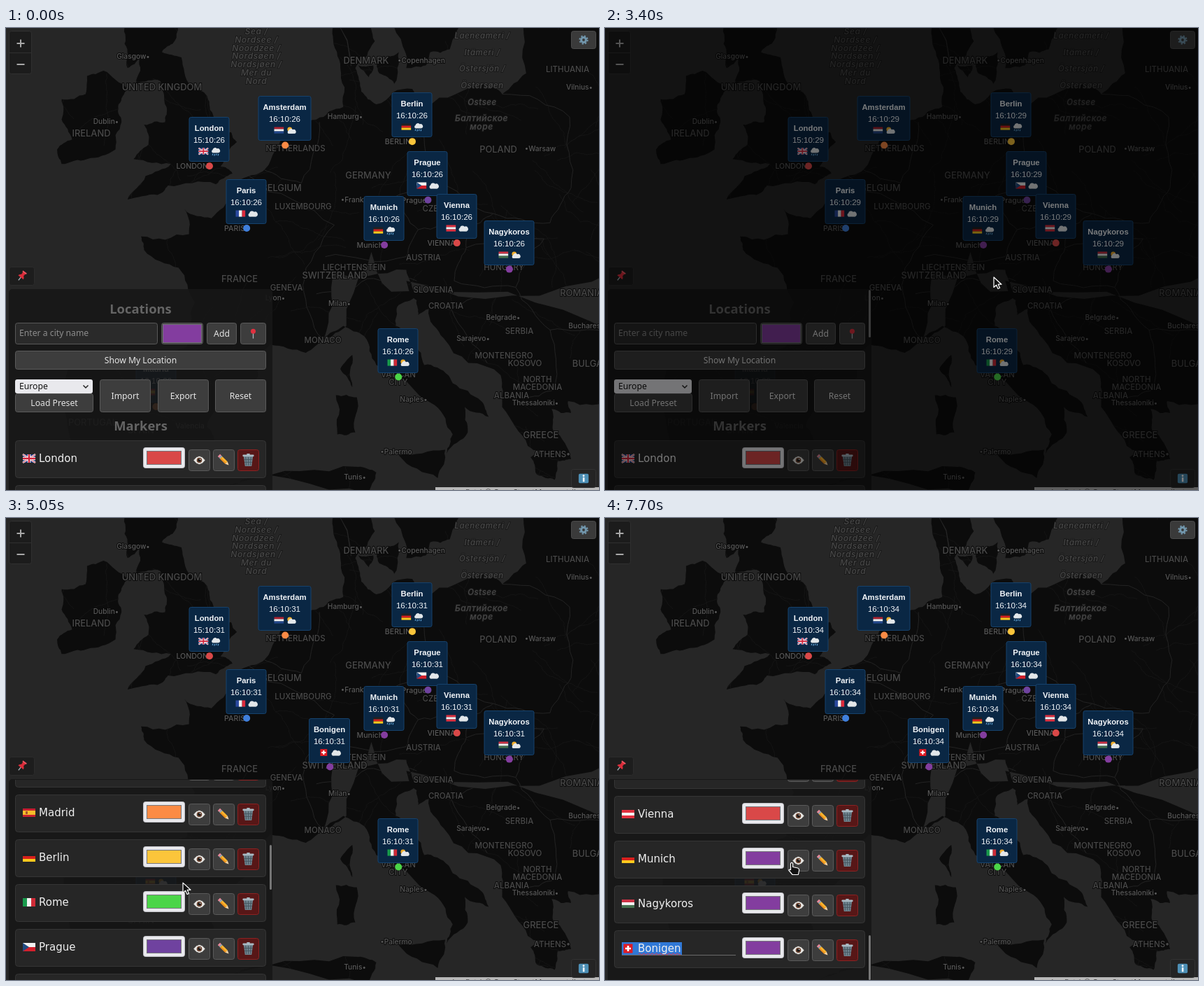
An HTML page for the animation above (8 s loop, 848 by 660 pixels).

```html
<!DOCTYPE html>
<html lang="en">
<head>
<meta charset="utf-8">
<title>City clocks</title>
<style>
html, body { margin: 0; width: 100%; height: 100%; overflow: hidden; background: #262626; }
svg { display: block; width: 848px; height: 660px; }
text { white-space: pre; }
.map { font-family: Inter, sans-serif; font-weight: 500; text-anchor: middle; paint-order: stroke; stroke: #0b0b0b; stroke-width: 1.8px; }
.land { fill: #494949; }
.town { fill: #585858; }
.sea { fill: #484848; font-style: italic; stroke: #181818; letter-spacing: .6px; }
.tip { font-family: "Liberation Sans", Arial, sans-serif; text-anchor: middle; fill: #f2f5f8; }
.ui { font-family: "Noto Sans", sans-serif; fill: #e4e4e4; }
.mid { text-anchor: middle; }
.head { fill: #646464; font-weight: 700; }
.row { font-family: "DejaVu Sans", sans-serif; fill: #efefef; }
</style>
</head>
<body>
<svg id="stage" viewBox="0 0 848 660" xmlns="http://www.w3.org/2000/svg"></svg>
<script>
const LOOP = 8000;
const PICK = 1750, ASK = 2450, ANSWER = 3550, ADDED = 4000, EDIT = 6750;
const RED = '#d94848', BLUE = '#3f7fdc', ORANGE = '#fb8b45', YELLOW = '#fbc53b', GREEN = '#4bd548', PURPLE = '#833d9f';

const rect = (x, y, w, h, fill, more = '') => `<rect x="${x}" y="${y}" width="${w}" height="${h}" fill="${fill}" ${more}/>`;
const box = (x, y, w, h, fill, edge, r = 0) => rect(x + .5, y + .5, w - 1, h - 1, fill, `rx="${r}" stroke="${edge}"`);
const path = (d, more = '') => `<path d="${d}" ${more}/>`;
const text = (x, y, size, cls, s, more = '') =>
  `<text x="${x}" y="${(y + size * .36).toFixed(1)}" font-size="${size}" class="${cls}" ${more}>${s}</text>`;
const at = (x, y, k, body) => `<g transform="translate(${x} ${y}) scale(${k})">${body}</g>`;
const dot = (x, y, r, fill) => `<circle cx="${x}" cy="${y}" r="${r}" fill="${fill}"/>`;

let seed = 7;
const random = () => (seed = (seed * 16807) % 2147483647) / 2147483647;

// Map: key points in longitude and latitude, roughened by midpoint displacement
const project = (lon, lat) => [
  293.8 + 21.43 * lon,
  1489.6 - 1228 * Math.log(Math.tan(Math.PI / 4 + lat * Math.PI / 360))
];
function rough(a, b, depth) {
  if (!depth) return [b];
  const k = (random() - .5) * .22;
  const m = [(a[0] + b[0]) / 2 + (b[1] - a[1]) * k, (a[1] + b[1]) / 2 - (b[0] - a[0]) * k];
  return [...rough(a, m, depth - 1), ...rough(m, b, depth - 1)];
}
const line = pts => 'M' + pts.flatMap((p, i) => i ? rough(pts[i - 1], p, 3) : [p])
  .map(p => p.map(v => v.toFixed(1)).join(' ')).join('L');
const points = s => s.split(',').map(p => project(...p.split(' ').map(Number)));
const shape = s => { const p = points(s); return line([...p, p[0]]) + 'Z'; };

const coasts = {
  ireland: '-6 53.3,-6.4 52.2,-8.3 51.8,-10 51.6,-10.3 52.2,-9.3 52.6,-10 53.4,-10 54.2,-8.4 54.4,-8.3 55.1,-7.2 55.3,-5.6 54.6,-6.2 54',
  britain: '-5.6 57.2,-5.8 56.3,-5.6 55.4,-4.8 55.8,-5 54.8,-3.4 54.9,-3 53.9,-3.1 53.3,-4.5 53.2,-4.2 52.4,-5.2 51.8,-2.7 51.6,-4.4 51.1,-5.6 50.1,-3.6 50.3,-2.9 50.7,.3 50.75,1.4 51.2,.6 51.5,1.7 52.5,1.3 52.9,.2 52.85,.1 53.6,-.4 54.4,-1.3 54.7,-2 55.8,-3.3 56,-2.6 56.3,-2 57.3',
  west: '3.1 41.9,.7 40.7,-.3 39.4,.2 38.7,-2 36.8,-8.9 37,-9.4 38.7,-9.2 43.1,-1.6 43.4,-1.1 45.5,-2.2 47.1,-4.5 47.9,-4.7 48.5,-1.5 48.6,-1.8 49.7,0 49.3,1.6 50.2,1.7 50.9,3.6 51.4,4.7 52.9,7 53.4,8.8 53.9,8.6 55.4,8.1 56.6,8.3 57.2,12 50,9 44.4,7.5 43.75,6.3 43.1,3.9 43.5,3.1 43',
  east: '8.3 57.2,10.4 57.4,10.9 56.4,9.6 55.4,10 54.5,11 54,13.4 54.6,14.3 53.9,18.3 54.8,19.4 54.4,21 55.2,21.1 57.5,27 57.5,27 44,12 46,9.5 50',
  zealand: '11 55.7,12.5 56,12.2 54.8,11.2 55.2',
  funen: '9.8 55.5,10.8 55.5,10.5 55.05',
  sweden: '12 57.5,13 55.4,14.3 55.5,14.6 56,15.9 56.1,16.6 57.5',
  italy: '7.5 43.75,8.8 44.4,10.2 43.9,11 42.5,14.9 40.5,16.1 39,15.7 38,17.1 39.1,16.9 40.4,18.5 39.9,18 40.7,16.1 41.6,15.8 42,14.2 42.5,13.5 43.6,12.3 44.4,12.4 45.3,13.5 45.7,13 47,8 47',
  balkans: '13 46.5,13.7 45.6,13.8 44.9,14.5 45.2,15.5 43.8,19.3 42,19.4 40.4,21.1 38.4,22.9 38.1,21.3 37.8,21.7 36.9,22.9 36.6,23.1 37.6,24 37.7,22.8 39.2,22.7 40.3,24 40.1,23.8 40.7,27 40.8,27 47',
  corsica: '8.6 42.3,9.4 43,9.4 41.4',
  sardinia: '8.3 41,9.7 40.9,9.6 39.1,8.4 39',
  sicily: '12.5 37.9,15.6 38.2,15.1 36.7',
  africa: '2 36.6,9.8 37.3,11 37,10.5 35.8,0 35.8'
};
const borders = ['2.5 51.1,8.2 49,6.1 46.3,7.5 43.75', '3.4 51.4,6 50.8,7.2 53.3',
  '14.3 53.9,14.8 50.9,12.2 50.2,13.8 48.8,17 48.8,18.8 49.5,14.8 50.9', '7.6 47.6,13 47.6,13.8 48.8',
  '19.4 54.4,23.9 53.5,24 50.6,22.6 49.1,18.8 49.5', '17 48.8,17 48,22.2 48.4,20.3 46.2,16.2 46.5,17 48',
  '7 45.9,10.4 46.6,13.7 46.5', '19 45.9,16 45.2,18.4 42.6', '20.3 46.2,22.6 44.2,26.5 44', '22.6 44.2,22.9 41.3,20.7 40.9'];
const land = Object.values(coasts).map(shape).join('');

// A faint web of roads, drawn on land only
function road() {
  let x = random() * 848, y = random() * 660, turn = random() * 6.3;
  const pts = [[x, y]];
  for (let i = 0; i < 4; i++) {
    turn += random() - .5;
    pts.push([x += 26 * Math.cos(turn), y += 26 * Math.sin(turn)]);
  }
  return line(pts);
}
const roads = Array.from({ length: 130 }, road).join('');

// Labels: "name x y" separated by commas, lines of one name by |
const labels = (list, size, cls) => list.split(',').map(s => {
  const [, name, x, y] = s.trim().match(/^(.+) (\d+) (\d+)$/);
  return name.split('|').map((n, i) => text(x, +y + i * (size - .3), size, 'map ' + cls, n)).join('');
}).join('');
const names =
  labels('Sea /|Nordsee /|Noordzee /|Nordsøen /|Nordsjøen /|Mer du|Nord 358 5,Балтийское|море 680 129', 12, 'sea') +
  ['Laeneameri /', 'Itämeri /', 'Östersjön /', 'Östersøen', 'Ostsee'].map((s, i) => text(681, 11 + i * 23.6, 11.4, 'map sea', s)).join('') +
  labels(`UNITED KINGDOM 223 84,IRELAND 122 150,DENMARK 515 46,POLAND 704 173,GERMANY 518 210,BELGIUM 394 228,
    SWITZERLAND 470 353,FRANCE 334 358,ROMANIA 823 378,BULGARIA 842 479,GREECE 765 581,PORTUGAL 124 563,SPAIN 193 574`, 12.9, 'land') +
  labels(`LITHUANIA 803 59,NETHERLANDS 414 172,LUXEMBOURG 425 255,CZECHIA 621 258,AUSTRIA 597 328,HUNGARY 712 342,
    LIECHTENSTEIN 498 342,SLOVENIA 611 374,CROATIA 629 397,MONACO 453 446,SERBIA 734 433,MONTENEGRO 712 468,KOSOVO 742 479,
    NORTH|MACEDONIA 760 502,ALBANIA 723 525,VATICAN|CITY 561 495,GENEVA 401 371,ATHENS• 781 609`, 11.5, 'land') +
  labels(`Glasgow• 182 40,Dublin• 143 133,•Copenhagen 594 46,Vilnius• 820 84,Hamburg• 485 126,•Warsaw 764 172,•Frankfurt 504 245,
    Lyon• 385 385,Milan• 477 393,Belgrade• 711 413,Sarajevo• 668 443,Thessaloniki• 757 535,Naples• 583 530,•Palermo 558 605,
    Tunis• 499 641,Bucharest 829 425,Valencia 263 568`, 10.2, 'town');

const map = `<clipPath id="soil">${path(land)}</clipPath>` + rect(0, 0, 848, 660, '#262626') + path(land, 'fill="#0c0c0c"') +
  `<g clip-path="url(#soil)" fill="none">${path(roads, 'stroke="#171717" stroke-width=".8"')}${path(borders.map(b => line(points(b))).join(''), 'stroke="#232323"')}</g>` + names;

// Small pictures
const bars = (cols, up) => cols.split(' ').map((c, i, a) => up
  ? rect(i * 18 / a.length, 0, 18 / a.length, 12, c)
  : rect(0, i * 12 / a.length, 18, 12 / a.length, c)).join('');
const stroke = (d, color, w) => path(d, `fill="none" stroke="${color}" stroke-width="${w}"`);
const flags = {
  gb: rect(0, 0, 18, 12, '#22377e') + stroke('M0 0L18 12M18 0L0 12', '#fff', 2.6) + stroke('M0 0L18 12M18 0L0 12', '#cf2038', .9) +
    stroke('M9 0V12M0 6H18', '#fff', 4.4) + stroke('M9 0V12M0 6H18', '#cf2038', 2.4),
  fr: bars('#2b4aa0 #f2f2f2 #dd2b3c', true), it: bars('#199a4c #f2f2f2 #cf2b37', true),
  es: bars('#c8202f #f7bd2a #f7bd2a #c8202f') + rect(4, 4, 3, 4, '#a8562c'),
  de: bars('#222 #d8201c #fbc91e'), nl: bars('#b02331 #f2f2f2 #24498d'), ru: bars('#f2f2f2 #2448a4 #d0281f'),
  ua: bars('#2a6fc4 #fbd42a'), at: bars('#e0303f #f5f5f5 #e0303f'), hu: bars('#cc3245 #f2f2f2 #45704f'),
  cz: bars('#f2f2f2 #d3202c') + path('M0 0L9 6L0 12Z', 'fill="#214a80"'),
  ch: rect(2.5, -.5, 13, 13, '#e01b24') + stroke('M9 2V10M5 6H13', '#fff', 2.6)
};
const puff = path('M-5 4.5A3 3 0 0 1 -5 -1A4.2 4.2 0 0 1 2.5 -3A3.4 3.4 0 0 1 6 4.5Z', 'fill="#e3e7ea"') +
  path('M-6.5 3.4Q0 5 7 3.2Q6.6 4.5 5.6 4.5H-5Z', 'fill="#b5c0c7"');
const weather = {
  cloud: puff,
  sun: dot(-2, -2, 3.8, '#f0ae2c') + at(.6, 1.2, .9, puff),
  rain: at(0, -2, .9, puff) + stroke('M-4 3.5L-5 6M-1 4L-2 6.8M2 3.5L1 6M5 4L4 6.5', '#6db4e8', 1.2)
};
const pic = {
  eye: path('M-9 0Q0 -13 9 0Q0 13 -9 0Z', 'fill="#e9e9e6" stroke="#33302e"') + dot(0, 0, 4, '#6d4633') + dot(0, 0, 2.2, '#161616') + dot(1.2, -1.4, .8, '#fff'),
  pencil: `<g transform="rotate(45)">${rect(-10.5, -2.4, 3, 4.8, '#e98a9b')}${rect(-7.5, -2.4, 2, 4.8, '#9fb0b8')}${rect(-5.5, -2.4, 11, 4.8, '#fbb52e')}${rect(-5.5, .6, 11, 1.8, '#e98a1c')}${path('M5.5 -2.4L10.5 0L5.5 2.4Z', 'fill="#f3d3a5"')}</g>`,
  trash: path('M-7 -6L-5 9H5L7 -6Z', 'fill="#6f848f"') + stroke('M-4 -5L-3 8M0 -5V8M4 -5L3 8M-6.3 -1H6.3M-5.8 3H5.8', '#46565f', 1) +
    rect(-8.5, -8.3, 17, 2.8, '#a9bac3', 'rx="1.2"') + rect(-2.5, -10, 5, 2, '#a9bac3', 'rx="1"'),
  pin: stroke('M0 -1V7.5', '#a9b4ba', 1.4) + dot(0, -3.4, 3.7, '#e0303f'),
  push: `<g transform="rotate(38)">${stroke('M0 2V8', '#a9b4ba', 1.3)}${path('M-2.6 -7H2.6L2 -2Q5 0 5 2.4H-5Q-5 0 -2 -2Z', 'fill="#d92d3a"')}${rect(-3.6, -8, 7.2, 2, '#ee5560')}</g>`,
  gear: dot(0, 0, 5.2, '#7297ad') + `<circle r="6" fill="none" stroke="#7297ad" stroke-width="2" stroke-dasharray="2.36"/>` + dot(0, 0, 2, '#3a3a3a'),
  info: rect(-7.5, -7, 15, 14, '#4d8fb5', 'rx="2"') + rect(-1.2, -1.5, 2.6, 6.5, '#fff') + dot(0, -4, 1.5, '#fff')
};

// name, flag, sky, colour, longitude, latitude, map caption
const cities = [
  ['London', 'gb', 'rain', RED, -.13, 51.51, 'LONDON'], ['Paris', 'fr', 'cloud', BLUE, 2.35, 48.86, 'PARIS'],
  ['Madrid', 'es', 'sun', ORANGE, -3.7, 40.42, ''], ['Berlin', 'de', 'rain', YELLOW, 13.4, 52.52, 'BERLIN'],
  ['Rome', 'it', 'sun', GREEN, 12.48, 41.91, ''], ['Prague', 'cz', 'cloud', '#6f429f', 14.45, 50.08, 'Prague'],
  ['Moscow', 'ru', 'cloud', RED, 37.6, 55.75, ''], ['Amsterdam', 'nl', 'sun', ORANGE, 4.92, 52.37, ''],
  ['Kyiv', 'ua', 'cloud', YELLOW, 30.5, 50.45, ''], ['Vienna', 'at', 'cloud', RED, 16.38, 48.21, 'VIENNA'],
  ['Munich', 'de', 'rain', PURPLE, 11.54, 48.12, 'Munich'], ['Nagykoros', 'hu', 'sun', PURPLE, 19.88, 47.03, ''],
  ['Bonigen', 'ch', 'cloud', PURPLE, 7.91, 46.68, '']
];
const pen = document.createElement('canvas').getContext('2d');
pen.font = 'bold 11.3px "Liberation Sans", Arial, sans-serif';

const caption = ([, , , , lon, lat, s]) => {
  const [x, y] = project(lon, lat);
  return text(x - 2, y, 10.6, 'map town', s, 'style="text-anchor:end"');
};
const spot = ([name, , , color, lon, lat]) => `<g class="at-${name}">${dot(...project(lon, lat), 5, color)}</g>`;
function tip([name, flag, sky, , lon, lat]) {
  const [x, y] = project(lon, lat).map(v => Math.round(v) - .5);
  const w = Math.max(57, Math.round(pen.measureText(name).width + 13)), top = y - 69;
  return `<g class="at-${name}">` + rect(x - w / 2, top, w, 63, '#0a2744', 'rx="2.5" stroke="#16426c"') +
    text(x, top + 15, 11.3, 'tip', name, 'font-weight="700"') + text(x, top + 32, 11.6, 'tip clock', '', `data-city="${name}"`) +
    at(x - 15, top + 44, .76, flags[flag]) + at(x + 9, top + 49, .88, weather[sky]) + '</g>';
}

// Panel; every button remembers its place so the pointer can react to it
const hot = [];
function button(x, y, w, h, label, icon = '', fill = '#3d3d3d', edge = '#5a5a5a') {
  hot.push([x, y, w, h]);
  return box(x, y, w, h, fill, edge, 3) + text(x + w / 2, y + h / 2, 12.2, 'ui mid', label) + at(x + w / 2, y + h / 2, .95, icon);
}
const swatch = (x, y, w, h, color) => box(x, y, w, h, color, '#77777c');

function row([name, flag, , color], i) {
  const y = 589 + 64 * i;
  const squiggle = `M48 ${y + 34}` + 'q1.5 -2.4 3 0t3 0'.repeat(10);
  const edit = name === 'Bonigen' ? `<g id="edit">${rect(24, y + 17, 86, 18.5, '#3078d6')}${stroke(`M24 ${y + 35.5}H187`, '#6a6a6a', 1)}${stroke(squiggle, '#e0394a', 1)}</g>` : '';
  return `<g class="at-${name}">` + box(13, y, 359, 54, '#262626', '#353535', 4) + edit +
    at(24, y + 20, 1, flags[flag]) + text(47, y + 26, 15, 'row', name) +
    box(196, y + 10, 60, 30, '#e9e9ed', '#c2c2c8', 3) + swatch(201, y + 15, 50, 20, color) +
    button(261, y + 13, 31, 31, '', pic.eye) + button(296, y + 13, 31, 31, '', pic.pencil) +
    button(331, y + 13, 31, 31, '', pic.trash, '#571717', '#8c2222') + '</g>';
}

const panel = rect(4, 373, 377, 300, '#171717', 'rx="5" fill-opacity=".89"') + '<g clip-path="url(#view)"><g id="list">' +
  text(192.5, 401, 18.4, 'ui head mid', 'Locations') +
  box(13, 421, 204, 31, '#2a2a2a', '#585858', 3) + text(19, 436, 12.2, 'ui', 'Enter a city name', 'style="fill:#8d8d8d"') +
  box(222, 421, 60, 31, '#3d3d3d', '#5a5a5a', 3) + swatch(224, 423, 56, 27, PURPLE) +
  button(287, 421, 43, 31, 'Add') + button(335, 421, 37, 31, '', pic.pin) +
  button(13, 461, 359, 27, 'Show My Location') +
  button(13, 522, 112, 27, 'Load Preset') + rect(13, 502, 111, 20, '#e9e9ed', 'rx="3"') +
  text(19, 511.5, 12.2, 'ui', 'Europe', 'style="fill:#111"') + stroke('M110.5 510.5L114 514L117.5 510.5', '#222', 1.5) +
  ['Import', 'Export', 'Reset'].map((s, i) => button(Math.round(134 + 82.5 * i), 502, 73, 47, s)).join('') +
  text(192.5, 568, 18.4, 'ui head mid', 'Markers') + cities.map(row).join('') + '</g></g>' +
  rect(377, 374, 3, 64, '#767676', 'rx="1.5" id="thumb"');

const controls = box(4, 4, 33, 62, '#1c1c1c', '#303030', 3) + stroke('M5 35.5H36', '#303030', 1) +
  stroke('M15.5 22H26.5M21 16.5V27.5M15.5 52H26.5', '#a8a8a8', 2) +
  button(808, 4, 36, 26, '', pic.gear, '#3a3a3a', '#4a4a4a') +
  rect(614, 656, 234, 4, '#b9b9b9') + text(846, 662.5, 11, 'ui', 'Leaflet | © OpenStreetMap contributors', 'text-anchor="end" style="fill:#444"') +
  button(808, 630, 36, 27, '', pic.info, '#242424', '#333') + button(4, 341, 37, 27, '', pic.push, '#1d1d1d', '#2c2c2c');

const edge = 'fill="#111" stroke="#fff" stroke-width="1.2" stroke-linejoin="round"';
const cursors = {
  arrow: path('M0 0V14.5L3.6 11.2L6 16.5L8.6 15.3L6.2 10.2H11Z', edge),
  hand: path('M-1.5 1.5Q0 -.8 1.6 1.5V6.5L8.6 8Q11 8.8 10.6 11.5L9.4 17.5H1L-4 11.5Q-4.4 9.4 -1.5 10.6Z', edge),
  cross: stroke('M0 -9.5V-2M0 2V9.5M-9.5 0H-2M2 0H9.5', '#fff', 4) + stroke('M0 -8.5V-1.5M0 1.5V8.5M-8.5 0H-1.5M1.5 0H8.5', '#111', 1.6)
};

const stage = document.getElementById('stage');
stage.innerHTML = '<clipPath id="view"><rect x="4" y="374" width="377" height="286"/></clipPath>' +
  map + cities.map(caption).join('') + cities.map(spot).join('') + cities.map(tip).join('') + panel + controls +
  rect(0, 0, 848, 660, '#000', 'id="dim"') +
  `<g id="cursor">${Object.entries(cursors).map(([k, c]) => `<g id="${k}">${c}</g>`).join('')}</g>`;

const $ = id => document.getElementById(id);
const show = (el, on) => { el.style.display = on ? '' : 'none'; };
const clamp = v => Math.max(0, Math.min(1, v));
const smooth = v => v * v * (3 - 2 * v);
const clocks = [...document.querySelectorAll('.clock')];
const added = [...document.querySelectorAll('.at-Bonigen')];

// time, x, y: the pointer rests at each place it visits
const track = [[50, 430, 62], [950, 350, 432], [PICK - 1, 350, 432], [PICK, 476, 359], [1850, 476, 359], [2000, 464, 356],
  [ASK, 464, 356], [3250, 574, 361], [3400, 556, 356], [ANSWER, 556, 356], [4350, 250, 520], [6050, 258, 523],
  [6500, 312, 610], [EDIT, 312, 610], [7400, 267, 492]];
const scroll = [[4430, 0], [4500, 6.5], [5050, 322], [5450, 641], [5650, 768]];

function sample(keys, t, ease = v => v) {
  const i = keys.findIndex(k => k[0] > t);
  if (i <= 0) return keys[i ? keys.length - 1 : 0].slice(1);
  const a = keys[i - 1], b = keys[i], f = ease((t - a[0]) / (b[0] - a[0]));
  return a.slice(1).map((v, n) => v + (b[n + 1] - v) * f);
}

function cursorKind(t, x, y, top) {
  if (t >= PICK && t < ASK) return 'cross';
  const over = y > 373 && hot.some(([bx, by, w, h]) => x > bx && x < bx + w && y + top > by && y + top < by + h);
  return over ? 'hand' : 'arrow';
}

function draw(t) {
  const ticks = Math.floor((t - 750) / 992) + 1;
  for (const c of clocks) {
    const city = c.dataset.city;
    c.textContent = city === 'Bonigen' && ticks < 5 ? '...' : `${city === 'London' ? 15 : 16}:10:${26 + ticks}`;
  }
  added.forEach(el => show(el, t >= ADDED));
  show($('edit'), t >= EDIT);

  const [top] = sample(scroll, t);
  $('list').setAttribute('transform', `translate(0 ${-top})`);
  show($('thumb'), t >= 600);
  $('thumb').setAttribute('y', 374 + top / 768 * 222);
  $('thumb').setAttribute('height', t < ADDED ? 68 : 64);
  $('dim').setAttribute('opacity', .5 * (clamp((t - ASK) / 100) - clamp((t - ANSWER) / 100)));

  const [x, y] = sample(track, t, smooth);
  const kind = cursorKind(t, x, y, top);
  show($('cursor'), t >= 50);
  $('cursor').setAttribute('transform', `translate(${x.toFixed(1)} ${y.toFixed(1)})`);
  for (const k in cursors) show($(k), k === kind);
}

let start;
function tick(now) {
  if (start === undefined) start = now;
  draw((now - start) % LOOP);
  requestAnimationFrame(tick);
}
draw(0);
requestAnimationFrame(tick);
</script>
</body>
</html>
```
